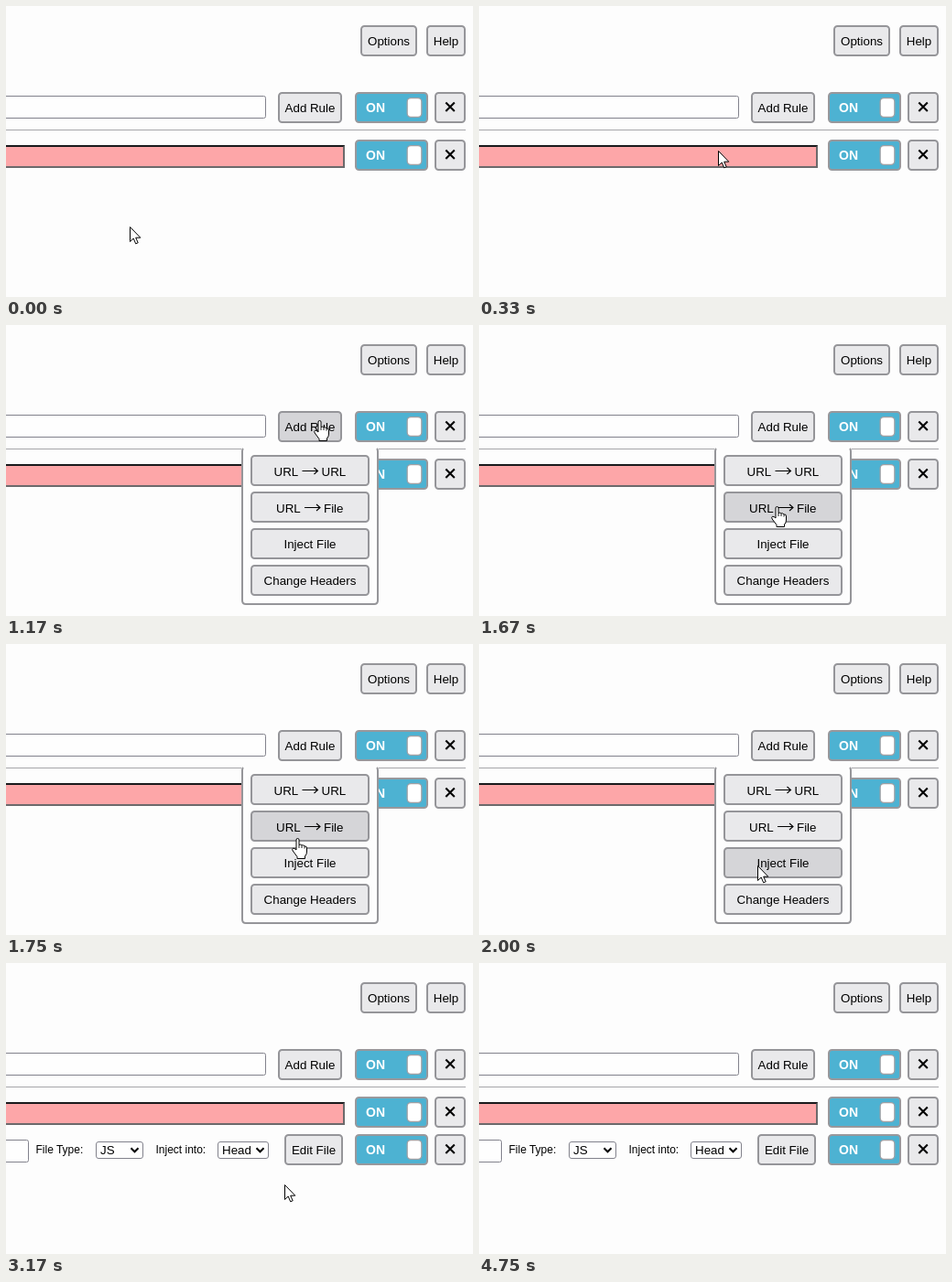
Animation, 510 px wide and 318 px high, one loop 5660 ms. Source, as an HTML page:

```html
<!DOCTYPE html>
<html lang="en">
<head>
<meta charset="utf-8">
<title>Add a rule</title>
<style>
  html, body { margin: 0; width: 100%; height: 100%; overflow: hidden; background: #fdfdfd; }
  svg { display: block; font: 13.333px "Liberation Sans", Arial, sans-serif; }
  .button { fill: #e9e9eb; stroke: #959599; stroke-width: 2; }
  .button.hover { fill: #d5d5d8; }
  .field { fill: #fefefe; stroke: #82828c; }
  .toggle { fill: #4db2d2; stroke: #98989c; stroke-width: 2; }
  .knob { fill: #fff; stroke: #a0a0a4; stroke-width: 1.3; }
  .on { fill: #fff; font-weight: bold; font-size: 14px; }
  .small { font-size: 12px; }
  .line { fill: none; stroke: #000; }
  .pointer { fill: #fff; stroke: #000; stroke-linejoin: round; }
</style>
</head>
<body>
<svg id="stage" width="510" height="318" viewBox="0 0 510 318"></svg>
<script>
const LOOP = 5660;
const stage = document.getElementById('stage');

function add(parent, tag, attrs = {}, text = '') {
  const node = document.createElementNS('http://www.w3.org/2000/svg', tag);
  for (const key in attrs) node.setAttribute(key, attrs[key]);
  node.textContent = text;
  parent.append(node);
  return node;
}

// A bordered box given by its outer edges.
function box(parent, cls, x, y, w, h, rx, border = 1) {
  return add(parent, 'rect', {
    class: cls, x: x + border / 2, y: y + border / 2,
    width: w - border, height: h - border, rx
  });
}

const label = (parent, x, y, text, cls = '') => add(parent, 'text', { x, y, class: cls }, text);
const line = (parent, d, width) => add(parent, 'path', { d, class: 'line', 'stroke-width': width });

function button(parent, x, y, w, text) {
  const rect = box(parent, 'button', x, y, w, 34, 3.5, 2);
  if (text) add(parent, 'text', { x: x + w / 2, y: y + 22, 'text-anchor': 'middle' }, text);
  return { rect, x, y, w, h: 34 };
}

function rowControls(parent, y) {
  box(parent, 'toggle', 381, y, 80, 34, 3.5, 2);
  label(parent, 393, y + 22, 'ON', 'on');
  box(parent, 'knob', 437.5, y + 6, 17, 22, 4, 1.3);
  button(parent, 468, y, 34);
  line(parent, `M480.3 ${y + 11.5}l9.5 9.5m0-9.5l-9.5 9.5`, 2.1);
}

function select(parent, x, w, text) {
  box(parent, 'field', x, 195, w, 19, 2.5);
  label(parent, x + 5, 209, text);
  line(parent, `M${x + w - 13.5} 202.3l4 4 4-4`, 2);
}

// Page
button(stage, 387, 21, 62, 'Options');
button(stage, 459, 21, 43, 'Help');
box(stage, 'field', -10, 98, 294, 25, 2);
const addRule = button(stage, 297, 94, 70, 'Add Rule');
rowControls(stage, 94);
add(stage, 'rect', { y: 135, width: 502, height: 1, fill: '#a6a6aa' });
add(stage, 'rect', { y: 152, width: 370, height: 25, fill: '#6c6a6c' });
add(stage, 'path', { d: 'M0 152H370L368 154H0z', fill: '#1a1a1c' });
add(stage, 'rect', { y: 154, width: 368, height: 21, fill: '#fda6a8' });
rowControls(stage, 146);

// New rule
const newRow = add(stage, 'g');
box(newRow, 'field', -10, 193, 35, 25, 2);
label(newRow, 32.5, 208, 'File Type:', 'small');
select(newRow, 98, 52, 'JS');
label(newRow, 163.5, 208, 'Inject into:', 'small');
select(newRow, 231, 56, 'Head');
button(newRow, 304, 187, 64, 'Edit File');
rowControls(newRow, 187);

// Drop-down menu
const menu = add(stage, 'g');
add(menu, 'path', { d: 'M257 134H407V301Q407 305 403 305H261Q257 305 257 301z', fill: '#fdfdfd' });
add(menu, 'path', {
  d: 'M259 135Q258 136 258 138V301Q258 305 262 305H402Q406 305 406 301V138Q406 136 405 135',
  fill: 'none', stroke: '#959599', 'stroke-width': 2
});
const items = ['', '', 'Inject File', 'Change Headers']
  .map((text, i) => button(menu, 267, 142 + 40 * i, 130, text));
[[292.5, 'URL'], [295, 'File']].forEach(([x, target], i) => {
  const y = 165 + 40 * i;
  label(menu, x, y, 'URL');
  label(menu, x + 52, y, target);
  line(menu, `M${x + 31} ${y - 5.5}h17m-4-3.5l4 3.5-4 3.5`, 1.1);
});

// Pointers, with the hot spot at 0,0
const arrow = add(stage, 'path', {
  class: 'pointer',
  d: 'M.5 .5V16.5L4.2 13 6.7 18.8 9.2 17.7 6.7 12.2H11.8z'
});
const hand = add(stage, 'g');
add(hand, 'path', {
  class: 'pointer',
  d: 'M-1 13V2Q-1 .5 .5 .5T2 2V7.5Q3.5 6.5 5 8 6.8 7.2 8 9 10.5 8.5 10.5 11V15Q10.5 18 8.5 20V22.5H0V20.5L-4.8 14Q-6 12 -4.5 11.2 -3 11 -1 13z'
});
line(hand, 'M2 7.5V11M5 8.3V11M8 9.3V11.5', 0.9);

// Pointer stops: time, x, y
const smooth = p => p * p * (3 - 2 * p);
const stops = [[0, 135, 241]];
[80, 160, 250, 330, 410, 500, 580].forEach((time, i) => {
  const p = smooth((i + 1) / 7);
  stops.push([time, Math.round(135 + 207 * p), Math.round(241 - 137 * p)]);
});
stops.push([1670, 325, 198], [1750, 318, 212], [1830, 311, 228], [1920, 306, 240], [2000, 304, 242]);

const show = (node, visible) => { node.style.visibility = visible ? 'visible' : 'hidden'; };
const inside = (b, x, y) => x >= b.x && x < b.x + b.w && y >= b.y && y < b.y + b.h;

function draw(t) {
  const [, x, y] = stops.findLast(stop => stop[0] <= t);
  const menuOpen = t >= 1170 && t < 3080;
  let over = false;
  for (const b of [addRule, ...items]) {
    const hover = inside(b, x, y) && (b === addRule || menuOpen);
    b.rect.classList.toggle('hover', hover);
    over ||= hover;
  }
  const useHand = over && t < 2000;
  show(menu, menuOpen);
  show(newRow, t >= 3080);
  show(hand, useHand);
  show(arrow, !useHand && t < 4750);
  for (const node of [hand, arrow]) node.setAttribute('transform', `translate(${x} ${y})`);
}

const start = performance.now();
function tick() {
  draw((performance.now() - start) % LOOP);
  requestAnimationFrame(tick);
}
tick();
</script>
</body>
</html>
```
